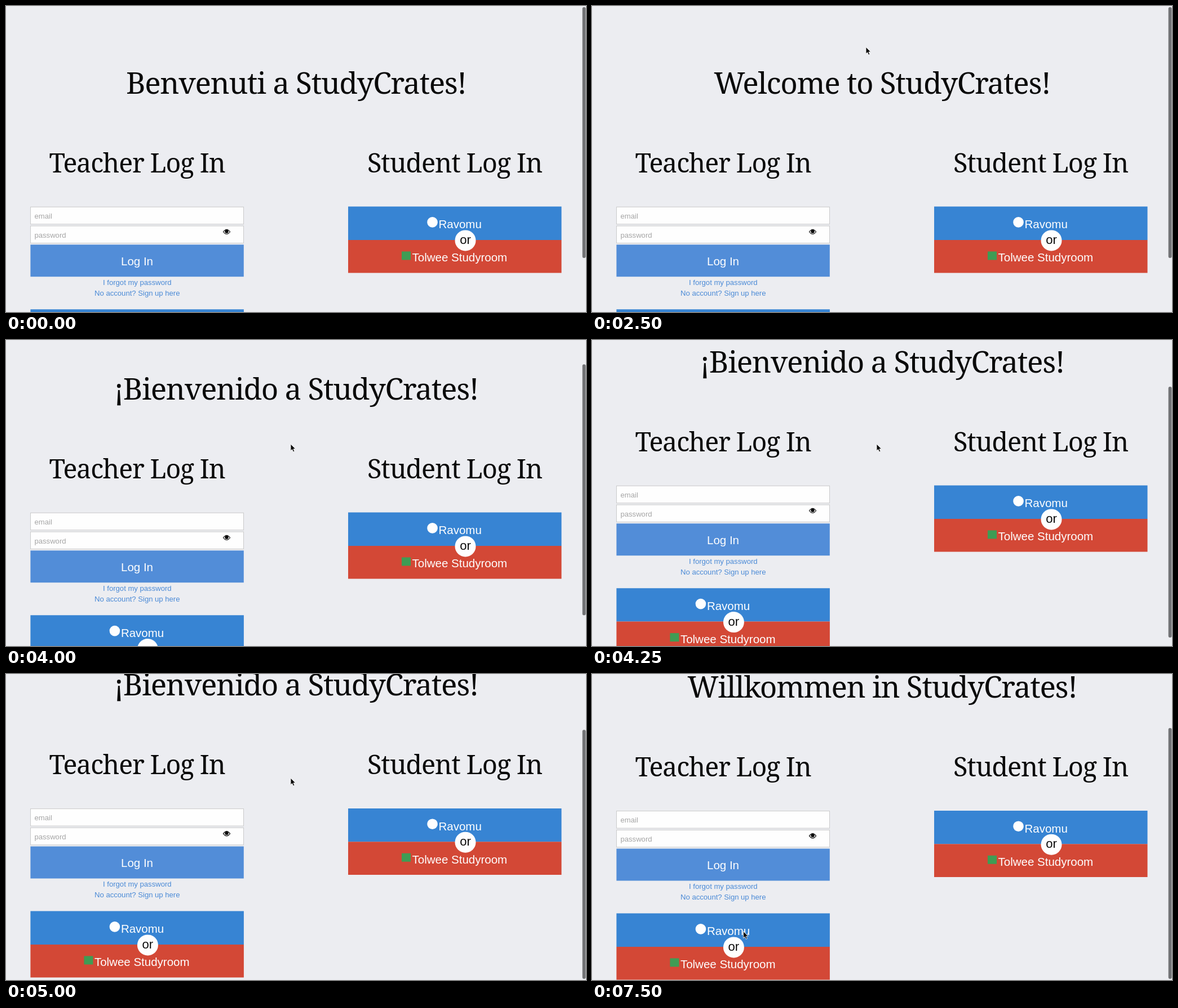
An HTML page that plays this animation: 1029 px wide and 544 px high, repeating every 8000 ms.

```html
<!DOCTYPE html>
<html lang="en">
<head>
<meta charset="utf-8">
<title>Log in</title>
<style>
  html, body { margin: 0; width: 100%; height: 100%; overflow: hidden; background: #ecedf1; }
  svg { display: block; font-family: "Liberation Sans", Arial, sans-serif; }
  .serif { font-family: "Noto Serif", serif; letter-spacing: -.025em; fill: #0a0a0a; }
  .mid { text-anchor: middle; }
  .field { fill: #fefefe; stroke: #cacaca; }
  .hint { font-size: 13.1px; fill: #a5a5a5; }
  .link { font-size: 13.1px; fill: #4a8ad6; }
  .label { font-size: 20.5px; fill: #fefefe; }
</style>
</head>
<body>
<svg width="1029" height="544" viewBox="0 0 1029 544">
  <defs>
    <g id="providers">
      <path fill="#3784d3" d="M0 0h378.5v59.3H0z"/>
      <path fill="#d34836" d="M0 59.3h378.5V118H0z"/>
      <circle cx="149.5" cy="27.8" r="9.3" fill="#fefefe"/>
      <text class="label" x="160.5" y="38.8">Ravomu</text>
      <path fill="#3f9c54" d="M95 79.8h16v15H95z"/>
      <text class="label" x="113.5" y="97.8">Tolwee Studyroom</text>
      <circle cx="208" cy="60.3" r="18.5" fill="#fefefe"/>
      <text class="mid" x="208" y="66.3" font-size="22" fill="#0a0a0a">or</text>
    </g>
  </defs>
  <rect width="1029" height="544" fill="#ecedf1"/>
  <g id="page">
    <text id="title" class="serif mid" x="514.8" y="156" font-size="53"></text>
    <g class="serif mid" font-size="46.5">
      <text x="232.5" y="295.5">Teacher Log In</text>
      <text x="796" y="295.5" font-size="47">Student Log In</text>
    </g>
    <rect class="field" x="43.5" y="357.3" width="378" height="30.5"/>
    <rect class="field" x="43.5" y="391" width="378" height="30.5"/>
    <text class="hint" x="50.5" y="377.5">email</text>
    <text class="hint" x="50.5" y="411.5">password</text>
    <path fill="none" stroke="#0a0a0a" stroke-width="1.2" d="M385.5 401.5q6-8.5 12 0q-6 8-12 0z"/>
    <circle cx="391.5" cy="400.8" r="3.2" fill="#0a0a0a"/>
    <path fill="#528dd8" d="M43.4 424.3h378.4v57H43.4z"/>
    <text class="label mid" x="232.5" y="460.5">Log In</text>
    <text class="link mid" x="232.8" y="496">I forgot my password</text>
    <text class="link mid" x="232.8" y="515">No account? Sign up here</text>
    <use href="#providers" x="607" y="356.6"/>
    <use href="#providers" x="43.4" y="539.3"/>
  </g>
  <rect id="thumb" x="1022.6" width="5.9" rx="2.9" fill="#717275"/>
  <path id="cursor" d="M0 0v12l2.700-2.500 1.900 4.300 2.200-.9-1.900-4.200h3.700z"
        fill="#0a0a0a" stroke="#fff" stroke-width=".8"/>
</svg>
<script>
const $ = id => document.getElementById(id);

// Each entry: start time in ms, then the value held until the next entry.
const greetings = [[0, "Benvenuti a"], [1250, "Welcome to"], [3250, "¡Bienvenido a"],
  [5250, "Bienvenu à"], [7250, "Willkommen in"]];
const scrolls = [[0, 0], [4000, 50], [4250, 98], [4500, 115.7], [4750, 117],
  [5000, 117.7], [5250, 113.7]];
const pointer = [[0, null], [2500, [486, 73]], [2750, [505, 185]], [5250, [449, 396]],
  [5500, [346, 434]], [5750, [333, 443]], [6000, [322, 454]], [6250, [302, 456]],
  [6500, [273, 457]], [6750, [268.5, 457.5]]];
const PERIOD = 8000, MAX_SCROLL = 113.7, THUMB_RATIO = 0.826;

const held = (steps, t) => steps.findLast(([start]) => start <= t)[1];

function draw(now) {
  const t = now % PERIOD;
  const scroll = held(scrolls, t);
  const tip = held(pointer, t);
  const title = held(greetings, t) + " StudyCrates!";
  if ($("title").textContent !== title) $("title").textContent = title;
  $("page").setAttribute("transform", `translate(0 ${-scroll})`);

  // The thumb shrinks while the page is pulled past its end.
  const over = Math.max(0, scroll - MAX_SCROLL);
  $("thumb").setAttribute("y", 2 + scroll * THUMB_RATIO);
  $("thumb").setAttribute("height", 446 - over * THUMB_RATIO);

  $("cursor").setAttribute("visibility", tip ? "visible" : "hidden");
  if (tip) $("cursor").setAttribute("transform", `translate(${tip})`);
  requestAnimationFrame(draw);
}
draw(performance.now());
</script>
</body>
</html>
```
